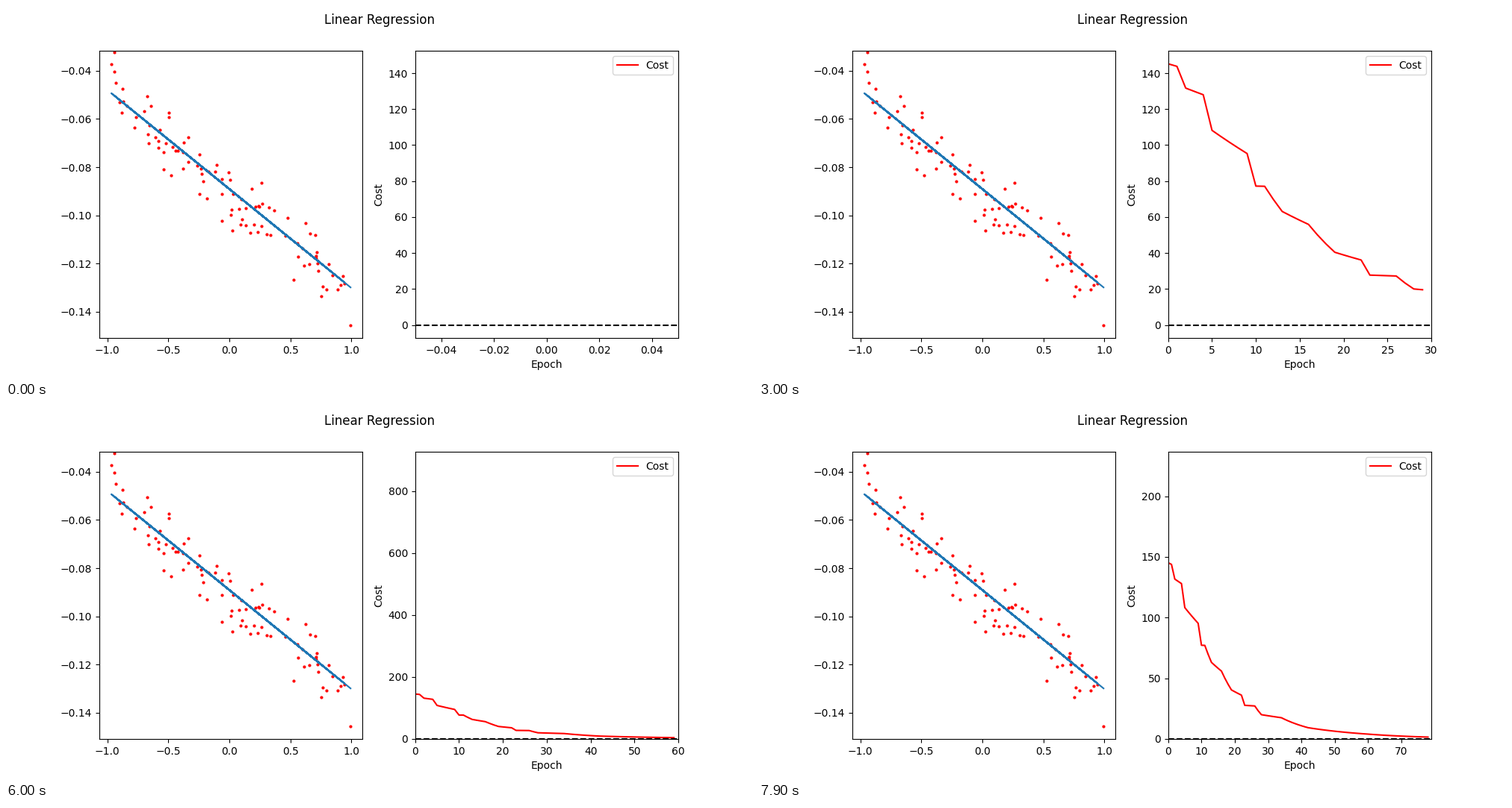
Animation of 1000x500 px, one loop 8 s. Source, as a matplotlib script:

```python
import numpy as np
import matplotlib.pyplot as plt
from matplotlib.animation import FuncAnimation

FRAMES = 80
INTERVAL = 100
ZOOM_START = 50  # epoch at which the cost axis starts to rescale

# Corners of the decaying cost curve: (epoch, cost)
COST_KEYS = [(0, 145.2), (1, 143.8), (2, 131.7), (4, 128), (5, 108.2),
             (9, 95.3), (10, 77.2), (11, 77.1), (13, 63.1), (16, 55.9),
             (19, 40.4), (22, 36.1), (23, 27.7), (26, 27.2), (28, 20),
             (34, 17.5), (42, 9.3), (60, 4), (78, 1.55)]
# Top of the cost axis while it rescales: (epoch, limit)
LIMIT_KEYS = [(50, 1560), (60, 927), (64, 508), (72, 433.5), (74, 335),
              (79, 236.6)]


def decay(epoch, keys):
    """Interpolate exponentially between key points."""
    at, value = np.transpose(keys)
    return np.exp(np.interp(epoch, at, np.log(value)))


def line(x):
    return -0.08907 - 0.04112 * x


epochs = np.arange(FRAMES)
cost = decay(epochs, COST_KEYS)

fig, (fit_ax, cost_ax) = plt.subplots(1, 2, figsize=(10, 5), dpi=100)
fig.suptitle("Linear Regression")

# Left panel: noisy samples, their two extremes, and the fitted line
rng = np.random.default_rng(7)
x = np.append(rng.uniform(-0.95, 0.95, 98), [-0.967, 0.993])
noise = np.clip(rng.normal(0, 0.008, 98), -0.016, 0.02)
y = line(x) + np.append(noise, [0.0119, -0.0158])
fit_ax.plot(x, y, "ro", markersize=2)
fit_ax.plot(x, line(x), color="tab:blue")
fit_ax.set_xlim(-1.065, 1.091)
fit_ax.set_ylim(-0.15089, -0.03169)

# Right panel: growing cost curve
curve, = cost_ax.plot([], [], "r", label="Cost")
cost_ax.axhline(0, color="black", linestyle="--")
cost_ax.set_xlabel("Epoch")
cost_ax.set_ylabel("Cost")
cost_ax.legend(loc="upper right")


def cost_limits(epoch):
    if epoch < ZOOM_START:
        margin = 0.05 * cost[0]
        return -margin, cost[0] + margin
    return 0, decay(epoch, LIMIT_KEYS)


def draw(epoch):
    curve.set_data(epochs[:epoch], cost[:epoch])
    cost_ax.set_xlim((0, epoch) if epoch else (-0.05, 0.05))
    cost_ax.set_ylim(cost_limits(epoch))
    return curve,


anim = FuncAnimation(fig, draw, frames=FRAMES, interval=INTERVAL,
                     repeat=True, repeat_delay=0)
plt.show()
```
